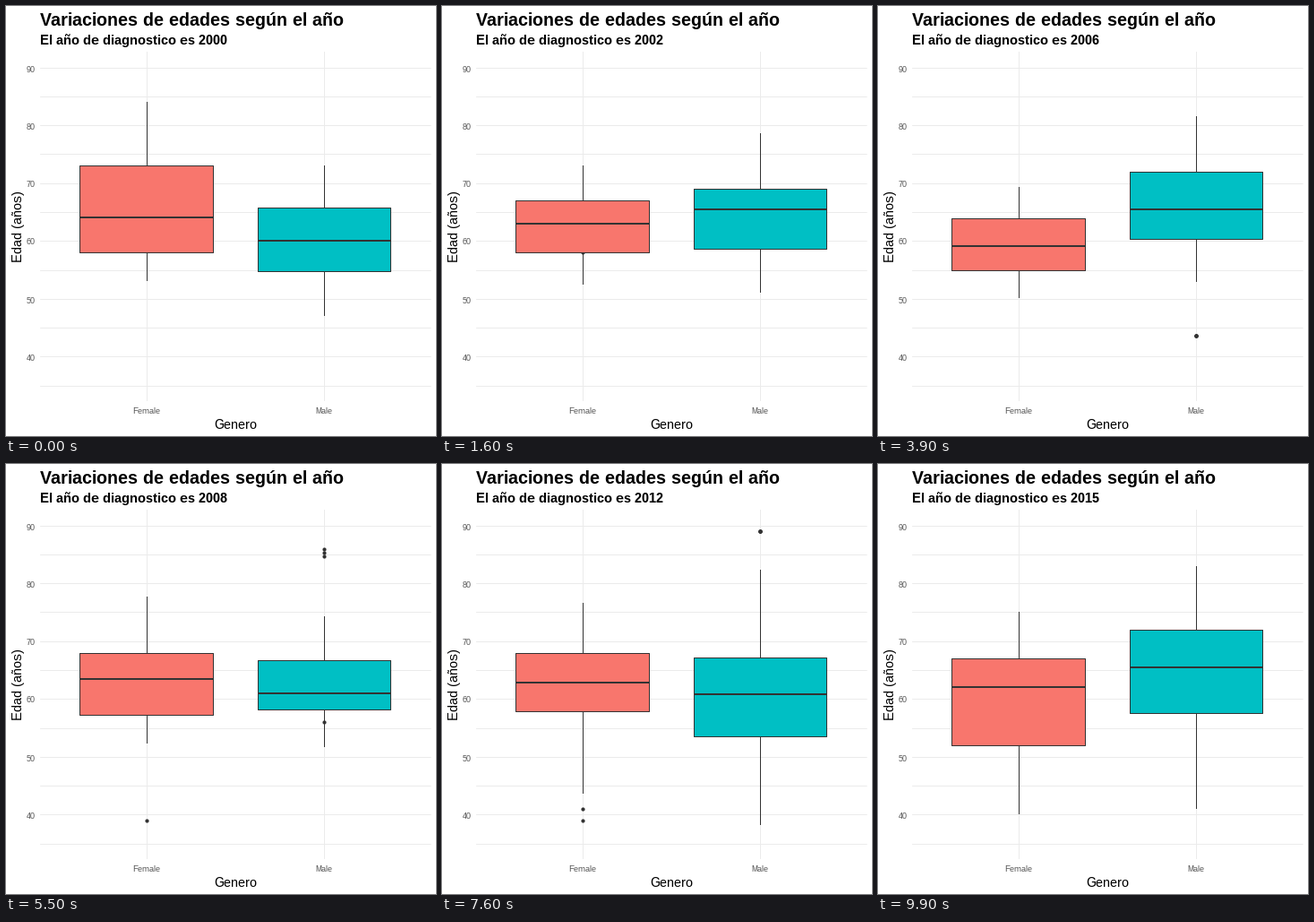
A matplotlib script that plays this animation: 480 px wide and 480 px high, repeating every 10000 ms.

```python
import matplotlib.pyplot as plt
import numpy as np
from matplotlib.animation import FuncAnimation
from matplotlib.patches import Rectangle

plt.rcParams.update({"font.family": "Liberation Sans",
                     "text.hinting": "native", "text.hinting_factor": 1})

SIZE, DPI, FRAMES, SPAN = 480, 100, 100, 15
PX = 72 / DPI
LEFT, RIGHT, TOP, BOTTOM = 38.1, 474.5, 51, 441
UNIT = (RIGHT - LEFT) / 2.2
INK, GRID = "#333333", "#EBEBEB"

# Key poses in seconds: lower whisker, Q1, median, Q3, upper whisker
TIMES = [0, 1.6, 3.9, 5.5, 6.8, 8.5, 9.9]
FEMALE = [(53, 58, 64, 73, 84), (52.4, 58, 63, 67, 73),
          (50.1, 54.9, 59.1, 63.9, 69.4), (52.3, 57.3, 63.5, 68, 77.7),
          (45.1, 58.7, 63, 68.6, 75), (42.1, 56.8, 62.7, 67.1, 78.6),
          (40, 52, 62, 67, 75)]
MALE = [(47, 54.75, 60, 65.75, 73), (51.1, 58.6, 65.5, 69, 78.6),
        (52.9, 60.4, 65.4, 72, 81.6), (51.7, 58.2, 61, 66.75, 74.3),
        (40.9, 54.4, 60.7, 67.4, 83.4), (35, 52.6, 60.9, 66.9, 81.1),
        (41, 57.5, 65.5, 72, 83)]

# Outlier paths as (years since 2000, age)
FEMALE_DOTS = [
    [(1, 84), (2, 43), (3, 78)],
    [(7, 35), (8, 39), (9, 39), (10, 41), (11, 41), (12, 37), (13, 37)],
    [(10, 41), (11, 45), (12, 37)]]
MALE_DOTS = [
    [(5, 47), (6, 43), (7, 43), (8, a), (9, 88), (11, 88), (12, 90), (13, 90)]
    for a in (40, 83, 84, 85)]

# Each year is reached on a whole frame
YEAR_FRAMES = np.round(np.linspace(0, FRAMES - 1, SPAN + 1))


def y_pos(age):
    return 69.2 + (90 - age) * 6.452


def mid(v):
    """Centre of the pixel that holds v."""
    return np.floor(v) + 0.5


def dot_ages(paths, n):
    """Ages of the outliers that exist on frame n."""
    year = np.interp(n, YEAR_FRAMES, np.arange(SPAN + 1))
    return np.array([np.interp(year, *zip(*p)) for p in paths
                     if p[0][0] - 0.9 < year < p[-1][0] + 0.9])


fig = plt.figure(figsize=(SIZE / DPI, SIZE / DPI), dpi=DPI, facecolor="white")
ax = fig.add_axes([0, 0, 1, 1])
ax.set(xlim=(0, SIZE), ylim=(SIZE, 0))
ax.axis("off")


def line(xs, ys, color=INK, width=1, z=3):
    return ax.plot(xs, ys, color=color, lw=width * PX, zorder=z, snap=False,
                   solid_capstyle="butt")[0]


def text(x, y, label, size, color="black", ha="left", **kw):
    return ax.text(x, y, label, fontsize=size * PX, color=color, ha=ha,
                   va="baseline", **kw)


class Box:
    def __init__(self, pos, poses, paths, fill):
        self.poses, self.paths = np.array(poses), paths
        centre = LEFT + UNIT * (pos - 0.4)
        x = mid(centre)
        x0, x1 = mid(centre - UNIT * 0.375), mid(centre + UNIT * 0.375)
        self.dot_x = np.floor(centre)
        self.dots = ax.scatter([], [], s=(4.2 * PX) ** 2, color=INK,
                               linewidths=0, zorder=2)
        self.low = line([x, x], [0, 0])
        self.high = line([x, x], [0, 0])
        self.rect = Rectangle((x0, 0), x1 - x0, 1, fc=fill, ec=INK, lw=PX,
                              zorder=4, snap=False, joinstyle="round")
        ax.add_patch(self.rect)
        self.median = line([x0, x1], [0, 0], width=2, z=5)

    def draw(self, n):
        ages = [np.interp(n / 10, TIMES, col) for col in self.poses.T]
        lo, q1, med, q3, hi = (y_pos(a) for a in ages)
        self.low.set_ydata([mid(q1), np.floor(lo)])
        self.high.set_ydata([np.floor(hi), mid(q3)])
        self.rect.set_y(mid(q3))
        self.rect.set_height(mid(q1) - mid(q3))
        self.median.set_ydata([np.floor(med)] * 2)
        ys = np.floor(y_pos(dot_ages(self.paths, n)))
        self.dots.set_offsets(np.column_stack([np.full(len(ys), self.dot_x),
                                               ys]))


for age in range(35, 91, 5):
    y = mid(y_pos(age))
    line([LEFT, RIGHT], [y, y], GRID, z=1)
    if age % 10 == 0:
        text(33, y + 4, str(age), 9, "#4D4D4D", "right")

for pos, name in ((1, "Female"), (2, "Male")):
    x = mid(LEFT + UNIT * (pos - 0.4))
    line([x, x], [TOP, BOTTOM], GRID, z=1)
    text(x - 1, 455, name, 9, "#4D4D4D", "center")

text(38, 22, "Variaciones de edades según el año", 20, weight="bold")
subtitle = text(38, 43, "", 15, weight="bold")
text(256, 472, "Genero", 15, ha="center")
text(18, 246, "Edad (años)", 15, ha="center", rotation=90,
     rotation_mode="anchor")

boxes = [Box(1, FEMALE, FEMALE_DOTS, "#F8766D"),
         Box(2, MALE, MALE_DOTS, "#00BFC4")]


def update(n):
    year = round(2000 + SPAN * n / (FRAMES - 1))
    subtitle.set_text(f"El año de diagnostico es {year}")
    for box in boxes:
        box.draw(n)
    return []


anim = FuncAnimation(fig, update, frames=FRAMES, interval=100, repeat=True,
                     repeat_delay=0, init_func=lambda: update(0))
plt.show()
```
